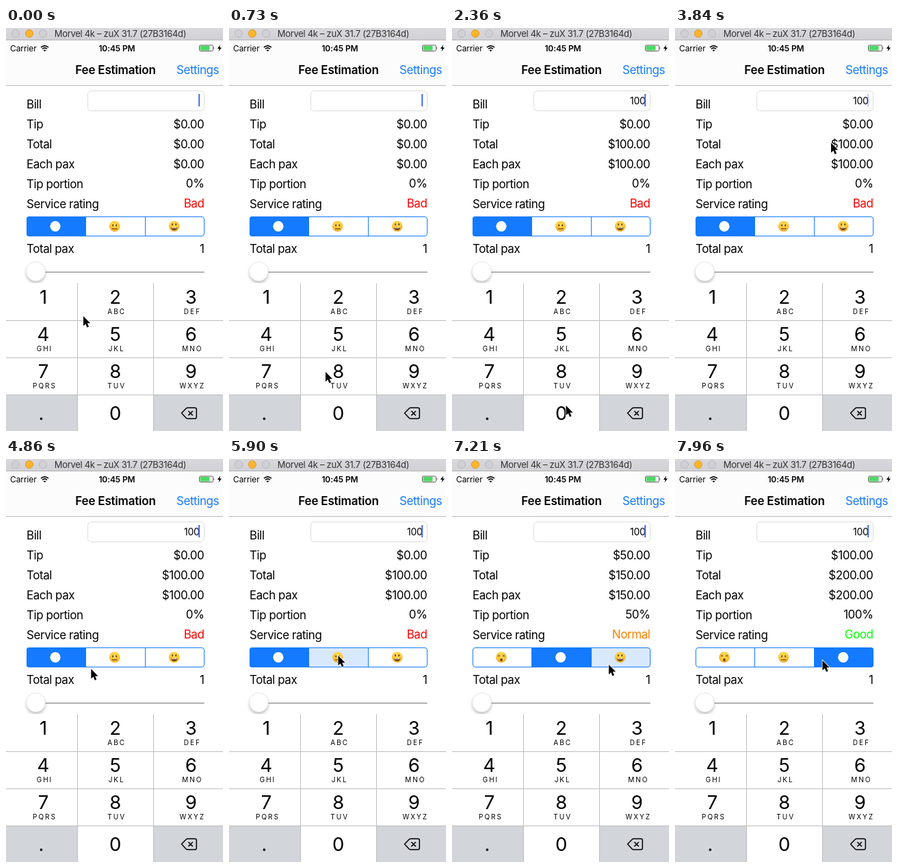
Write an HTML page that moves like this. It is 317 by 586 pixels and loops after 8 s.

```html
<!DOCTYPE html>
<html lang="en">
<head>
<meta charset="utf-8">
<title>Tip calculator</title>
<style>
  html, body { margin: 0; width: 100%; height: 100%; overflow: hidden; background: #fff; }
  svg { display: block; width: 317px; height: 586px; }
  text { font: 17px Inter, "Open Sans", sans-serif; letter-spacing: -.45px; fill: #000; white-space: pre; }
  .end { text-anchor: end; }
  .mid { text-anchor: middle; }
  .bold { font-weight: 600; }
  .title { letter-spacing: -.2px; }
  .window { font-size: 13px; letter-spacing: -.3px; fill: #333; }
  .status { font-size: 12px; letter-spacing: -.1px; }
  .link { fill: #147aff; }
  .bill { font-size: 14px; letter-spacing: -.3px; }
  .digit { font-size: 27.5px; letter-spacing: 0; }
  .letters { font-size: 10px; letter-spacing: 2px; }
</style>
</head>
<body>
<svg id="stage" viewBox="0 0 317 586" xmlns="http://www.w3.org/2000/svg">
  <defs>
    <linearGradient id="chrome" x2="0" y2="1">
      <stop stop-color="#d8d8dd"/><stop offset="1" stop-color="#d0d0d6"/>
    </linearGradient>
    <radialGradient id="skin" cy=".35" r=".7">
      <stop stop-color="#ffe05a"/><stop offset=".6" stop-color="#fdc735"/><stop offset="1" stop-color="#e89a1c"/>
    </radialGradient>
    <filter id="soft" x="-50%" y="-50%" width="200%" height="200%"><feGaussianBlur stdDeviation="2"/></filter>
    <clipPath id="segmentClip"><rect x="30" y="274" width="260" height="29" rx="4"/></clipPath>
  </defs>

  <rect width="317" height="586" fill="#fff"/>
  <rect y="18" width="317" height="65" fill="#fcfcfc"/>
  <rect y="83" width="317" height="1" fill="#b9b9b9"/>

  <rect width="317" height="17" fill="url(#chrome)"/>
  <rect y="17" width="317" height="1" fill="#b5b5b5"/>
  <g fill="#d0d0d5" stroke="#b8b8be">
    <circle cx="14" cy="8" r="5.5"/><circle cx="54" cy="8" r="5.5"/>
    <circle cx="34" cy="8" r="5.5" fill="#fdb52c" stroke="#dd9a2a"/>
  </g>
  <text class="window mid" x="167" y="13">Morvel 4k – zuX 31.7 (27B3164d)</text>

  <text class="status" x="6" y="34">Carrier</text>
  <g fill="none" stroke="#000" stroke-width="1.6">
    <path d="M51 28.2Q56.5 23.4 62 28.2M53 30.5Q56.5 27.3 60 30.5"/>
    <path d="M56.5 34.2L54.6 32.2Q56.5 30.7 58.4 32.2Z" fill="#000" stroke="none"/>
  </g>
  <text class="status bold mid" x="162" y="34">10:45 PM</text>
  <rect x="282.5" y="25" width="20" height="8.5" rx="1.8" fill="#fff" stroke="#333" stroke-width=".8"/>
  <rect x="283.5" y="26" width="14" height="6.5" rx=".8" fill="#4cd964"/>
  <path d="M303.6 27.5q1.8 1.7 0 3.6z" fill="#333"/>
  <path d="M313 24.5L308.8 30H311.5L310.6 34L315 28.4H312.2Z"/>

  <text class="title bold mid" x="160" y="67">Fee Estimation</text>
  <text class="link end" x="311" y="67">Settings</text>

  <rect x="119.5" y="91.5" width="170" height="29" rx="5" fill="#fff" stroke="#dcdcdc"/>
  <text id="bill" class="bill end" x="282.5" y="111"></text>
  <rect id="caret" x="281.2" y="96" width="2" height="18" fill="#426bf2"/>

  <g id="rows"></g>
  <g id="segments"></g>

  <rect x="31" y="354" width="259" height="2" rx="1" fill="#b3b3b3"/>
  <circle cx="43.5" cy="357" r="14" fill="#000" opacity=".24" filter="url(#soft)"/>
  <circle cx="43.5" cy="354" r="14" fill="#fff" stroke="#d8d8d8" stroke-width=".6"/>

  <g id="keypad"></g>

  <path id="pointer" d="M0 0V14.2L3.3 11.2L5.5 16.4L8 15.3L5.8 10.3H10.2Z" stroke="#fff" stroke-width="1.6" paint-order="stroke"/>
</svg>

<script>
const LOOP = 8000, STEP = 147.4;
const BLUE = "#147aff", GREY = "#d2d5da", BROWN = "#6b3a0c";
const $ = id => document.getElementById(id);

function add(parent, tag, attrs, text = "") {
  const node = document.createElementNS("http://www.w3.org/2000/svg", tag);
  for (const name in attrs) node.setAttribute(name, attrs[name]);
  node.textContent = text;
  return parent.appendChild(node);
}

// Form rows
const values = {};
[["Bill", 117], ["Tip", 146], ["Total", 175], ["Each pax", 204],
 ["Tip portion", 233], ["Service rating", 262], ["Total pax", 327]].forEach(([label, y]) => {
  add($("rows"), "text", { x: 30, y }, label);
  values[label] = add($("rows"), "text", { x: 289.4, y: y === 233 || y === 262 ? y - 1 : y, class: "end" });
});
values["Total pax"].textContent = "1";

// Rating control
const ratings = [
  { name: "Bad", color: "#f00", share: 0 },
  { name: "Normal", color: "#ff8000", share: .5 },
  { name: "Good", color: "#0f0", share: 1 }
];
const faces = [
  g => {
    add(g, "path", { d: "M-5-3.6l3 3m0-3l-3 3M2-3.6l3 3m0-3l-3 3", stroke: BROWN, "stroke-width": 1 });
    add(g, "ellipse", { cy: 3.8, rx: 1.9, ry: 2.1, fill: BROWN });
  },
  g => {
    eyes(g, -1.4);
    add(g, "path", { d: "M-3.8 3.6H3.8", stroke: BROWN, "stroke-width": 1.2 });
  },
  g => {
    eyes(g, -2.6);
    add(g, "path", { d: "M-4.8 1.2Q0 2.2 4.8 1.2Q4 5.8 0 5.8T-4.8 1.2Z", fill: BROWN });
    add(g, "path", { d: "M-4 1.7Q0 2.5 4 1.7L3.6 2.7Q0 3.3-3.6 2.7Z", fill: "#fff" });
  }
];
function eyes(g, cy) {
  for (const cx of [-2.5, 2.5]) add(g, "ellipse", { cx, cy, rx: 1, ry: 1.6, fill: BROWN });
}

const edges = [30, 116.5, 203.5, 290];
const segmentFills = add($("segments"), "g", { "clip-path": "url(#segmentClip)" });
const segments = ratings.map((_, i) => {
  const fill = add(segmentFills, "rect", { x: edges[i], y: 274, width: edges[i + 1] - edges[i], height: 29 });
  const place = { transform: `translate(${[72, 158.7, 245.7][i]} 288.3)` };
  const face = add($("segments"), "g", place);
  add(face, "circle", { r: 7.8, fill: "url(#skin)" });
  faces[i](face);
  const dot = add($("segments"), "circle", { ...place, r: 7.6, fill: "#fff" });
  return { fill, face, dot };
});
add($("segments"), "rect", { x: 30.5, y: 274.5, width: 259, height: 28, rx: 3.5, fill: "none", stroke: BLUE });
add($("segments"), "path", { d: "M116.5 275V302M203.5 275V302", stroke: BLUE });

// Number pad
const pad = $("keypad"), keyRects = {};
const columns = [0, 105, 216, 317], centers = [54.5, 159.7, 270.3];
add(pad, "rect", { y: 371, width: 317, height: 215, fill: "#fff" });
["1", "2 ABC", "3 DEF", "4 GHI", "5 JKL", "6 MNO", "7 PQRS", "8 TUV", "9 WXYZ", ".", "0", "del"].forEach((key, i) => {
  const col = i % 3, row = Math.floor(i / 3), top = 371 + row * 54;
  const [digit, letters] = key.split(" ");
  const shaded = digit === "." || digit === "del";
  keyRects[digit] = add(pad, "rect", {
    x: columns[col], y: top, width: columns[col + 1] - columns[col], height: 55, fill: shaded ? GREY : "#fff"
  });
  if (digit !== "del") {
    add(pad, "text", { x: centers[col] - (digit === "." ? 3 : 0), y: row === 3 ? 570 : top + 30, class: "digit mid" }, digit);
  }
  if (letters) add(pad, "text", { x: centers[col] + 2, y: top + 45, class: "letters mid" }, letters);
});
add(pad, "path", { d: "M104.5 371V586M215.5 371V586M0 425.5H317M0 479.5H317M0 533.5H317", stroke: "#bdbdc0" });
add(pad, "path", {
  d: "M256.5 560L263 553.2Q264 552.3 265.4 552.3H276Q278.3 552.3 278.3 554.6V565.6Q278.3 568 276 568H265.4Q264 568 263 567ZM266.4 557l6.4 6.4m0-6.4l-6.4 6.4",
  fill: "none", stroke: "#000", "stroke-width": 1.5, "stroke-linejoin": "round"
});

// Pointer path: [step, x, y]
const path = [
  [0, 113, 419], [2, 80, 400], [3, 80, 400], [5, 141, 500], [8, 165, 556], [15, 165, 556],
  [16, 166.5, 549], [19, 188, 400], [21, 213, 250], [23, 232, 152], [24, 232, 150],
  [26, 228, 167], [28, 180, 222], [31, 73, 336], [34, 150, 290], [36, 160, 286],
  [38, 159.5, 286], [43, 159.5, 286], [47, 229, 299], [52, 229, 299], [54, 215.5, 293]
];
function pointerAt(step) {
  const i = path.findIndex(p => p[0] >= step);
  if (i === 0) return path[0].slice(1);
  const [a, ax, ay] = path[i - 1], [b, bx, by] = path[i];
  const f = (step - a) / (b - a);
  return [ax + (bx - ax) * f, ay + (by - ay) * f];
}

function caretOpacity(t) {
  if (t > 870 && t < 2400) return 1; // stays lit while typing
  const phase = (t + 840) % 1200;
  const distance = Math.min(phase, 1200 - phase);
  return Math.max(0, Math.min(1, (distance - 60) / 200));
}

const within = (step, from, to) => step >= from && step < to;
const money = n => "$" + n.toFixed(2);

function draw(step) {
  const bill = step < 6 ? "" : step < 11 ? "1" : step < 12 ? "10" : "100";
  const selected = step < 42 ? 0 : step < 50 ? 1 : 2;
  const pressed = within(step, 40, 42) ? 1 : within(step, 48, 50) ? 2 : -1;
  const rating = ratings[selected];
  const tip = bill * rating.share, total = +bill + tip;

  $("bill").textContent = bill;
  $("caret").setAttribute("opacity", caretOpacity(step * STEP));
  values["Tip"].textContent = money(tip);
  values["Total"].textContent = values["Each pax"].textContent = money(total);
  values["Tip portion"].textContent = rating.share * 100 + "%";
  values["Service rating"].textContent = rating.name;
  values["Service rating"].style.fill = rating.color;

  segments.forEach(({ fill, face, dot }, i) => {
    const on = i === selected;
    fill.setAttribute("fill", on ? BLUE : i === pressed ? "#d8e9fe" : "#fff");
    face.style.display = on ? "none" : "";
    dot.style.display = on ? "" : "none";
  });
  keyRects["1"].setAttribute("fill", within(step, 2, 4) ? GREY : "#fff");
  keyRects["0"].setAttribute("fill", within(step, 10, 12) ? GREY : "#fff");
  $("pointer").setAttribute("transform", `translate(${pointerAt(step)})`);
}

// The screen refreshes in even steps
const start = performance.now();
let shown = -1;
function tick() {
  const t = (performance.now() - start) % LOOP;
  const step = Math.min(54, Math.floor((t + 10) / STEP));
  if (step !== shown) draw(shown = step);
  requestAnimationFrame(tick);
}
tick();
</script>
</body>
</html>
```
